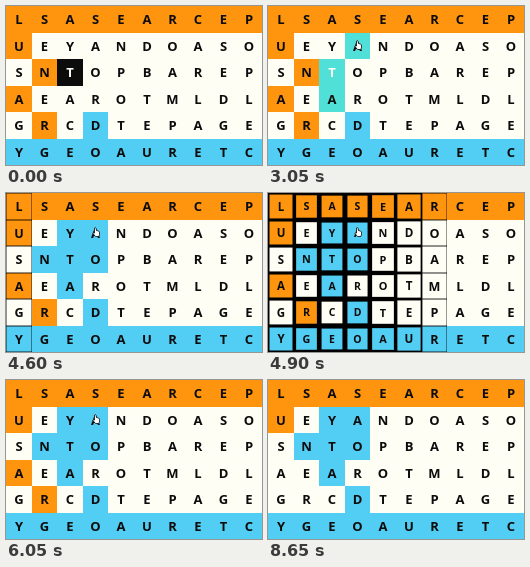
Recreate the animation shown at these times as an HTML page with a canvas. Size 256 by 159 pixels, loop 8.7 s.

```html
<!DOCTYPE html>
<html lang="en">
<head>
<meta charset="utf-8">
<title>Word grid</title>
<style>
html, body { margin: 0; width: 100%; height: 100%; overflow: hidden; background: #000; }
canvas { display: block; }
</style>
</head>
<body>
<canvas id="stage" width="256" height="159"></canvas>
<script>
const ctx = document.getElementById('stage').getContext('2d');
const LOOP = 8700, W = 25.6, H = 26.5;
const ORANGE = '#ff950f', BLUE = '#52cdf3', TEAL = '#50e0d8', PAPER = '#fffef5', INK = '#0c0c0c';
const letters = ['LSASEARCEP', 'UEYANDOASO', 'SNTOPBAREP', 'AEAROTMLDL', 'GRCDTEPAGE', 'YGEOAURETC'];
const owners = ['oooooooooo', 'o.........', '.ox.......', 'o.........', '.o.b......', 'bbbbbbbbbb'];
const fill = { o: ORANGE, b: BLUE, x: INK, '.': PAPER };

// column + row: when the tile is picked
const picks = { '23': 1150, '22': 1450, '31': 1950 };
// column + row: when the tile turns over, and its new colour
const flips = {
  '34': [3280, BLUE], '23': [3480, BLUE], '22': [3680, BLUE], '31': [3880, BLUE],
  '21': [4090, BLUE], '12': [4120, BLUE], '32': [4150, BLUE],
  '03': [6350, PAPER], '14': [6500, PAPER]
};
const FLIP = 300, WAVE_START = 4580, WAVE = 400, WAVE_STEP = 50;

// cursor stops: time, x, y
const path = [
  [300, 118, 146], [700, 89, 116], [950, 89, 116], [1130, 66, 90], [1250, 66, 90],
  [1430, 66, 64], [1700, 66, 64], [1930, 87, 34], [7000, 87, 34]
];

const clamp = v => Math.max(0, Math.min(1, v));
const ease = v => v * v * (3 - 2 * v);

function drawTile(c, r, t) {
  const key = '' + c + r;
  let color = fill[owners[r][c]];
  let ink = color === INK ? PAPER : INK;
  let turn = 1;
  if (t >= picks[key]) color = TEAL;
  if (flips[key]) {
    const p = clamp((t - flips[key][0]) / FLIP);
    turn = Math.abs(Math.cos(Math.PI * p));
    if (p >= .5) { color = flips[key][1]; ink = INK; }
  }
  const wave = clamp((t - WAVE_START - c * WAVE_STEP) / WAVE);
  const size = 1 - .2 * Math.sin(Math.PI * wave);
  const x = Math.round(c * W), y = Math.round(r * H);
  const w = Math.round((c + 1) * W) - x, h = Math.round((r + 1) * H) - y;
  ctx.save();
  ctx.translate(x + w / 2, y + h / 2);
  ctx.scale(size * turn, size);
  ctx.fillStyle = color;
  ctx.fillRect(-w / 2, -h / 2, w, h);
  ctx.fillStyle = ink;
  ctx.fillText(letters[r][c], 0, 4.8);
  ctx.restore();
}

function drawCursor(t) {
  const i = path.findIndex(p => p[0] > t);
  if (i < 1) return;
  const [t0, x0, y0] = path[i - 1], [t1, x1, y1] = path[i];
  const k = ease((t - t0) / (t1 - t0));
  ctx.save();
  ctx.translate(x0 + (x1 - x0) * k, y0 + (y1 - y0) * k);
  ctx.fillStyle = '#fff';
  ctx.strokeStyle = '#111';
  ctx.lineWidth = .8;
  const hand = new Path2D('M1.5 1Q2.5 0 3 1L3.5 3.5L5.5 4L6.5 5V8L5.5 9.5H2.5L0 6.5Q0 5.5 1.5 6Z');
  ctx.fill(hand);
  ctx.stroke(hand);
  ctx.restore();
}

function draw() {
  const t = performance.now() % LOOP;
  ctx.fillStyle = '#000';
  ctx.fillRect(0, 0, 256, 159);
  ctx.font = '600 13px "Noto Sans", "Open Sans", sans-serif';
  ctx.textAlign = 'center';
  for (let r = 0; r < 6; r++) for (let c = 0; c < 10; c++) drawTile(c, r, t);
  drawCursor(t);
  requestAnimationFrame(draw);
}
draw();
</script>
</body>
</html>
```
